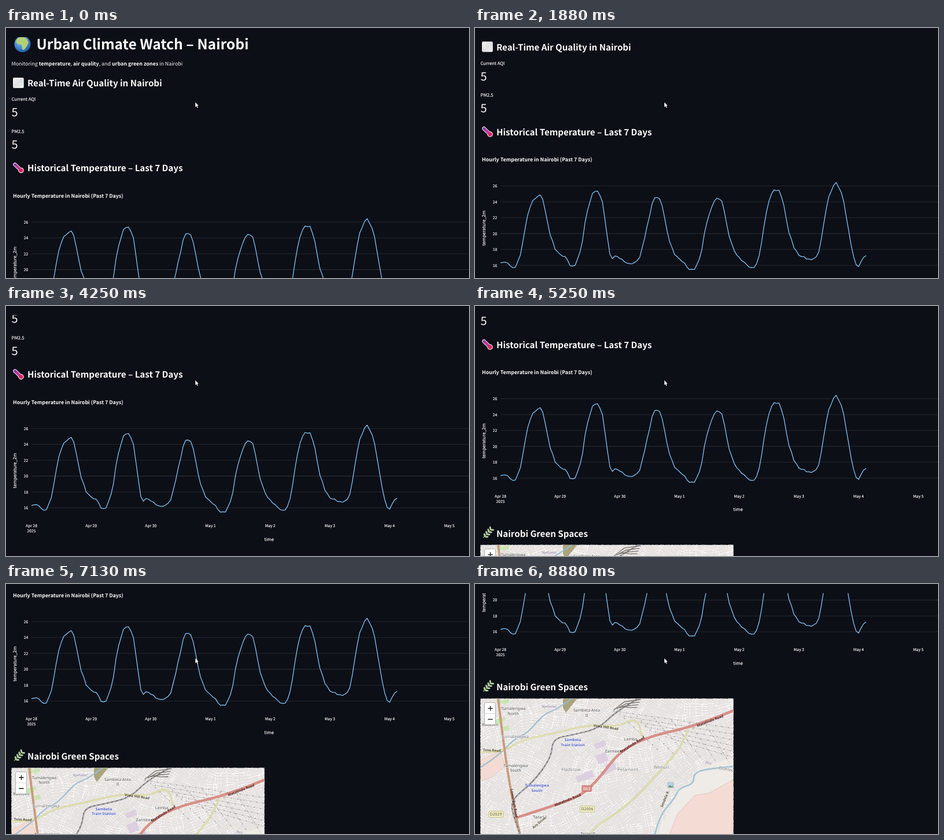
An HTML page for the animation above (9010 ms loop, 800 px wide and 433 px high).

```html
<!DOCTYPE html>
<html lang="en">
<head>
<meta charset="utf-8">
<title>Urban Climate Watch</title>
<style>
  html, body { margin: 0; width: 100%; height: 100%; overflow: hidden; background: #0c0f16; }
  svg { display: block; width: 800px; height: 433px; text-rendering: geometricPrecision; }
  text { font-family: "Noto Sans CJK JP", "Noto Sans CJK SC", "Noto Sans CJK", "Noto Sans", sans-serif; fill: #fafafa; }
  .h1 { font-size: 24.5px; font-weight: 700; }
  .h3 { font-size: 15.1px; font-weight: 600; }
  .body { font-size: 8.85px; }
  .bold { font-size: 8.9px; font-weight: 700; }
  .label { font-size: 7.75px; }
  .value { font-size: 20px; }
  .tick { font-size: 6.75px; }
  .label, .tick { stroke: #fafafa; stroke-width: .15px; }
  .mid { text-anchor: middle; }
  .map path { fill: none; stroke-linejoin: round; stroke-linecap: round; }
  .map text { font-family: "Noto Sans", sans-serif; font-size: 7px; text-anchor: middle; fill: #4d4d4d; }
  .map .place, .map .town, .map .stop { paint-order: stroke; stroke: #fff; stroke-opacity: .6; stroke-width: 1.3px; }
  .map .town { font-size: 8px; fill: #808080; }
  .map .stop { font-size: 6.5px; font-weight: 700; fill: #4f5fc6; }
  .map .lane { font-size: 6px; font-weight: 600; fill: #55533c; }
  .map .main { font-size: 6.2px; font-weight: 700; fill: #4b2422; }
  .map .water { font-size: 6px; font-style: italic; fill: #8c8ab0; }
</style>
</head>
<body>
<svg viewBox="0 0 800 433">
  <defs>
    <radialGradient id="sea" cx=".4" cy=".3" r=".75">
      <stop offset="0" stop-color="#8fc4ee"/><stop offset=".6" stop-color="#3f86cf"/><stop offset="1" stop-color="#234f9c"/>
    </radialGradient>
    <linearGradient id="fog" x1="0" y1="0" x2="1" y2="1">
      <stop offset="0" stop-color="#f7f7f8"/><stop offset=".5" stop-color="#dfe0e4"/><stop offset="1" stop-color="#f2f2f4"/>
    </linearGradient>
    <clipPath id="mapBox"><rect x="9.5" y="198.5" width="437" height="250"/></clipPath>
  </defs>
  <rect width="800" height="433" fill="#0c0f16"/>

  <g id="page">
    <circle cx="28.5" cy="28" r="14" fill="url(#sea)"/>
    <path d="M20 18 Q25 14 31 16 L36 19 L39 25 L35 33 L31 38 L28 37 L27 29 L20 28 L17 24Z" fill="#b5cf74"/>
    <text class="h1" x="52.5" y="36.8">Urban Climate Watch – Nairobi</text>
    <text class="body" x="9.5" y="65.3">Monitoring <tspan font-weight="700">temperature</tspan>, <tspan font-weight="700">air quality</tspan>, and <tspan font-weight="700">urban green zones</tspan> in Nairobi</text>

    <rect x="12" y="86" width="18.8" height="18" rx="2" fill="url(#fog)"/>
    <text class="h3" x="37" y="101.3">Real-Time Air Quality in Nairobi</text>
    <text class="label" x="9.5" y="126.2">Current AQI</text>
    <text class="value" x="9.5" y="153.3">5</text>
    <text class="label" x="9.5" y="181.5">PM2.5</text>
    <text class="value" x="9.5" y="208.6">5</text>

    <g stroke-linecap="round">
      <path d="M15.5 236.5 L26 246.5" stroke="#f3e6f4" stroke-width="6.5"/>
      <circle cx="26" cy="246.5" r="4.8" fill="#f3e6f4"/>
      <path d="M15.5 236.5 L25 245.5" stroke="#8e2f9c" stroke-width="4.4"/>
      <path d="M18 239 L25 245.5" stroke="#e0328c" stroke-width="2"/>
      <circle cx="26" cy="246.5" r="3.6" fill="#e0245e"/>
    </g>
    <text class="h3" x="37" y="248.2">Historical Temperature – Last 7 Days</text>

    <text class="bold" x="12" y="293.7">Hourly Temperature in Nairobi (Past 7 Days)</text>
    <g id="chart"></g>
    <text class="label mid" transform="translate(17.8 409) rotate(-90)">temperature_2m</text>
    <text class="label mid" x="454.5" y="530.8">time</text>

    <path d="M14 577 Q20 572 27 562" fill="none" stroke="#93b47f" stroke-width="1.2"/>
    <g id="herb" fill="#b3cfa0"></g>
    <text class="h3" x="37" y="575.2">Nairobi Green Spaces</text>

    <g class="map" transform="translate(0 390.7)" clip-path="url(#mapBox)">
      <rect x="9" y="198" width="438" height="252" fill="#e8e4e1"/>
      <g id="land"></g>
      <g id="names"></g>
      <rect x="333" y="344" width="10" height="9" fill="#b4d3f2" stroke="#a8b0b8" stroke-width=".8"/>
      <path d="M334 352 L337 348 L339 351 L341 349 L342 352Z" style="fill:#4c9b45"/>
      <rect x="16.5" y="205.5" width="19" height="38" rx="2" fill="#fff" stroke="#b3b0ac"/>
      <path d="M17 224.500 H35" stroke="#ccc" stroke-width=".8"/>
      <path d="M22.8 215.3 H30.2 M26.5 211.6 V219 M22.8 234.3 H30.2" stroke="#111" stroke-width="1.3"/>
    </g>
  </g>

  <rect width="800" height="15.8" fill="#0c0f16"/>
  <path d="M327.2 128.8 V137 L329.1 135.3 L330.4 138.3 L331.7 137.7 L330.4 134.8 L332.7 134.6Z" fill="#fff"/>
</svg>

<script>
const NS = 'http://www.w3.org/2000/svg';
const $ = id => document.getElementById(id);

let seed = 17;
const rnd = () => (seed = seed * 16807 % 2147483647) / 2147483647;
const span = (a, b) => a + (b - a) * rnd();

function add(parent, tag, attrs, text) {
  const el = document.createElementNS(NS, tag);
  for (const k in attrs) el.setAttribute(k, attrs[k]);
  if (text) el.textContent = text;
  parent.appendChild(el);
  return el;
}

// Temperature chart: a key every third hour, smoothed to hourly values
const dayW = 103.13, hours = 148;
const keys = [
  16.5, 16.4, 15.7, 17.3, 22.4, 24.4, 24.3, 19.8, 17.7,
  17.1, 15.9, 17.7, 22.9, 25.3, 24.0, 17.4, 17.1,
  16.4, 16.2, 17.0, 21.0, 24.5, 23.5, 19.0, 17.1,
  16.3, 15.5, 16.8, 21.4, 24.1, 24.1, 19.6, 17.3,
  16.4, 15.7, 17.2, 22.8, 25.5, 24.6, 20.1, 17.8,
  17.1, 16.7, 17.7, 23.1, 26.1, 25.2, 20.4, 16.1,
  17.0, 17.4
];
const tempY = t => 336 + (26 - t) * 13.75;

function tempAt(hour) {
  const u = (hour + 1) / 3, i = Math.floor(u), f = u - i;
  const [a, b, c, d] = [-1, 0, 1, 2].map(k => keys[Math.max(0, Math.min(keys.length - 1, i + k))]);
  return b + f / 2 * (c - a + f * (2 * a - 5 * b + 4 * c - d + f * (3 * (b - c) + d - a)));
}

function drawChart() {
  const g = $('chart');
  for (let t = 16; t <= 26; t += 2) {
    add(g, 'path', { d: `M44 ${tempY(t)}H800`, stroke: t === 20 ? '#383b41' : '#2b2e34', 'stroke-width': .8 });
    add(g, 'text', { class: 'tick', x: 38.3, y: tempY(t) + 2.5, 'text-anchor': 'end' }, String(t));
  }
  const pts = Array.from({ length: hours }, (_, h) => {
    const t = tempAt(h) + (h % 3 === 2 ? 0 : span(-.2, .2));
    return `${(44 + h * dayW / 24).toFixed(2)},${tempY(t).toFixed(2)}`;
  });
  add(g, 'polyline', { points: pts.join(' '), fill: 'none', stroke: '#83c9ff', 'stroke-width': 1.25, 'stroke-linejoin': 'round' });
  for (let i = 0; i < 8; i++) {
    const name = i < 3 ? `Apr ${28 + i}` : `May ${i - 2}`;
    add(g, 'text', { class: 'tick mid', x: 44 + i * dayW, y: 507 }, name);
  }
  add(g, 'text', { class: 'tick mid', x: 44, y: 516 }, '2025');
}

function drawHerb() {
  for (let i = 0; i < 4; i++) {
    const at = `translate(${17 + i * 3.3} ${575 - i * 4})`;
    for (const turn of [-100, 5]) {
      add($('herb'), 'ellipse', { cx: 3, rx: 3.2, ry: 1.5, transform: `${at} rotate(${turn})` });
    }
  }
}

// Street map
const land = $('land'), names = $('names');

const line = (d, stroke, width, dash = 'none') =>
  add(land, 'path', { d, stroke, 'stroke-width': width, 'stroke-dasharray': dash });
const area = (points, fill, stroke = 'none') => add(land, 'polygon', { points, fill, stroke, 'stroke-width': .7 });

// Smooth curve guided by a few points
function curve(str) {
  const p = str.split(' ').map(s => s.split(',').map(Number));
  const last = p.length - 1;
  let d = `M${p[0]}`;
  for (let i = 1; i < last; i++) {
    const end = i === last - 1 ? p[last] : [(p[i][0] + p[i + 1][0]) / 2, (p[i][1] + p[i + 1][1]) / 2];
    d += `Q${p[i]} ${end}`;
  }
  return d;
}
function road(pts, casing, fill, width) {
  line(curve(pts), casing, width + 1);
  line(curve(pts), fill, width);
}
function label(kind, s, x, y, turn = 0) {
  s.split('|').forEach((row, i) =>
    add(names, 'text', { class: kind, transform: `translate(${x} ${y + i * 8.5}) rotate(${turn})` }, row));
}
function shield(s, x, y, fill, ink, edge) {
  const w = 4 + s.length * 4.2;
  add(names, 'rect', { x: x - w / 2, y: y - 5, width: w, height: 10.5, rx: 1.5, fill, stroke: edge, 'stroke-width': .8 });
  add(names, 'text', { x, y: y + 2.8, style: `fill:${ink}` }, s);
}
function patches(count, x0, x1, y0, y1, size, fill) {
  for (let i = 0; i < count; i++) {
    const x = span(x0, x1), y = span(y0, y1);
    add(land, 'rect', { x, y, width: span(.6, 1.2) * size, height: span(.5, 1) * size, fill, transform: `rotate(-20 ${x} ${y})` });
  }
}

function drawStreets() {
  let d = '';
  const cell = 19;
  for (let x = 12; x < 450; x += cell) {
    for (let y = 200; y < 450; y += cell) {
      const turn = Math.sin(x * .013 + y * .02) * .7 + span(-.25, .25);
      const c = Math.cos(turn), s = Math.sin(turn), half = span(9, 13), gap = span(3.4, 5.4);
      const stroke = (a, b, e, f) => `M${(x + a * c - b * s).toFixed(1)} ${(y + a * s + b * c).toFixed(1)}L${(x + e * c - f * s).toFixed(1)} ${(y + e * s + f * c).toFixed(1)}`;
      for (let k = -half; k < half; k += gap) {
        if (rnd() < .85) d += stroke(-half, k, half, k);
        if (rnd() < .35) d += stroke(k, -half, k, half);
      }
    }
  }
  line(d, '#cbc6c4', 1.5);
  line(d, '#fefdfd', 1);
}

function drawMap() {
  drawStreets();

  area('152,198 177,198 157,223 152,214', '#aaa47d');
  area('10,304 44,290 52,316 30,334 10,341', '#f3dbd3', '#e6bdb4');
  area('446,300 384,320 378,340 352,356 308,450 446,450', '#efebe6');
  area('446,339 405,362 380,366 350,398 330,450 446,450', '#f4dcd5', '#e4b5ae');
  patches(7, 12, 56, 200, 262, 11, '#c9e5b3');
  patches(6, 172, 232, 265, 335, 17, '#dccfdf');

  road('168,198 140,218 122,224 108,238 88,260 68,268 40,298 9,318', '#8fb3c6', '#a9cade', 1);
  road('447,316 400,320 378,328 378,346 352,354 346,370 318,402 309,440', '#8fb3c6', '#a9cade', 1.3);

  for (let i = 0; i < 6; i++) {
    const d = `M${240 + i * 18} ${220 + i * 9}L446 ${250 + i * 10}M${250 + i * 30} ${225 + i * 4}l${70 - i * 6} 66`;
    line(d, '#b7b2b2', .5);
    line(d, '#8d8888', 1.5, '.1 11');
  }

  const yellow = ['#c3c190', '#e6e6ae', 1.8];
  road('9,291 48,292 80,270 140,258 200,243 246,248 284,229 288,263', ...yellow);
  road('368,252 360,276 326,318 262,386 204,422 194,440', ...yellow);

  const ring = '40,198 46,250 57,330 68,390 79,440';
  road(ring, '#a87c62', '#e0aa88', 2.6);
  line(curve(ring), '#a87c62', .6);
  const main = '447,219 385,245 300,264 250,290 215,336 185,366 130,386 74,404';
  road(main, '#c4716c', '#dc908a', 3.2);

  const rail = curve('284,198 245,219 215,250 170,261 134,268 132,300 100,344 62,374 66,402 80,440');
  line(rail, '#737176', 2.2);
  line(rail, '#e4e2e2', .9, '4 4');
  for (let i = 0; i < 4; i++) line(`M${240 + i * 5} ${218 - i * 2}L${258 + i * 3} ${204 + i * 3.4}L${286 - i * 2} ${200 + i * 4.6}`, '#756f6b', 1.3);

  label('water', 'Nyalumet', 128, 213.5);
  label('water', 'Piru', 403, 312, 8);
  label('place', 'Sambeta Area|II', 193, 221);
  label('place', 'Tumalengwa|North', 66, 218);
  label('place', 'Tumalengwa|South', 70, 316.5);
  label('place', 'Rudezko', 26, 246);
  label('place', 'Lemba', 269, 270.5);
  label('place', 'Zarmeen', 239, 291.5);
  label('place', 'Tazari I', 112, 405.5);
  label('place', 'Tazari II', 195, 434.5);
  label('town', 'Tumalengwa', 69, 267);
  label('town', 'Hadstow', 166, 323.5);
  label('town', 'Pelamont', 264, 323.5);
  label('town', 'Wenuri', 322, 319.5);
  label('town', 'Odelwani', 438, 324, 10);
  label('stop', 'Sambeta|Train Station', 169, 272);
  label('stop', 'Tumalengwa|South', 107, 351);
  label('lane', 'Tuvo Road', 29, 290, 3);
  label('lane', 'Vuna Hill Road', 226, 250, 8);
  label('lane', 'Aro Drive', 112, 415, -40);
  label('lane', 'Sendela R.', 330, 373, -68);
  label('main', 'Lower Belt Road', 65.5, 380, 80);
  label('main', 'Matalindo Road', 407, 239, -21);
  label('main', 'Matalindo Road', 273, 280, -32);
  label('main', 'Matalindo Road', 161, 376, -22);

  shield('B63', 193, 354, '#d98a83', '#fff', '#c4716c');
  for (const [s, x, y] of [['D2006', 194, 389.5], ['D2029', 36, 398.5]]) shield(s, x, y, '#f3f1c4', '#55533c', '#b9b47c');
}

// Scroll gestures: start and end in ms, offsets in px, easing
const moves = [
  { start: 0, end: 250, from: 0, to: 1, ease: u => u },
  { start: 375, end: 2625, from: 1, to: 74, ease: u => 1 - (1 - u) ** 1.68 },
  { start: 2750, end: 6125, from: 74, to: 228, ease: u => u ** 1.39 },
  { start: 6375, end: 8875, from: 228, to: 390.7, ease: u => u ** 1.11 }
];
function scrollAt(t) {
  const m = moves.findLast(m => t >= m.start);
  const u = Math.min(1, (t - m.start) / (m.end - m.start));
  return m.from + (m.to - m.from) * m.ease(u);
}

const loop = 9010, step = 125;
const page = $('page');
function frame() {
  const t = performance.now() % loop;
  const shown = Math.min(71, Math.floor(t / step)) * step;
  page.setAttribute('transform', `translate(0 ${-scrollAt(shown).toFixed(2)})`);
  requestAnimationFrame(frame);
}

drawChart();
drawHerb();
drawMap();
frame();
</script>
</body>
</html>
```
